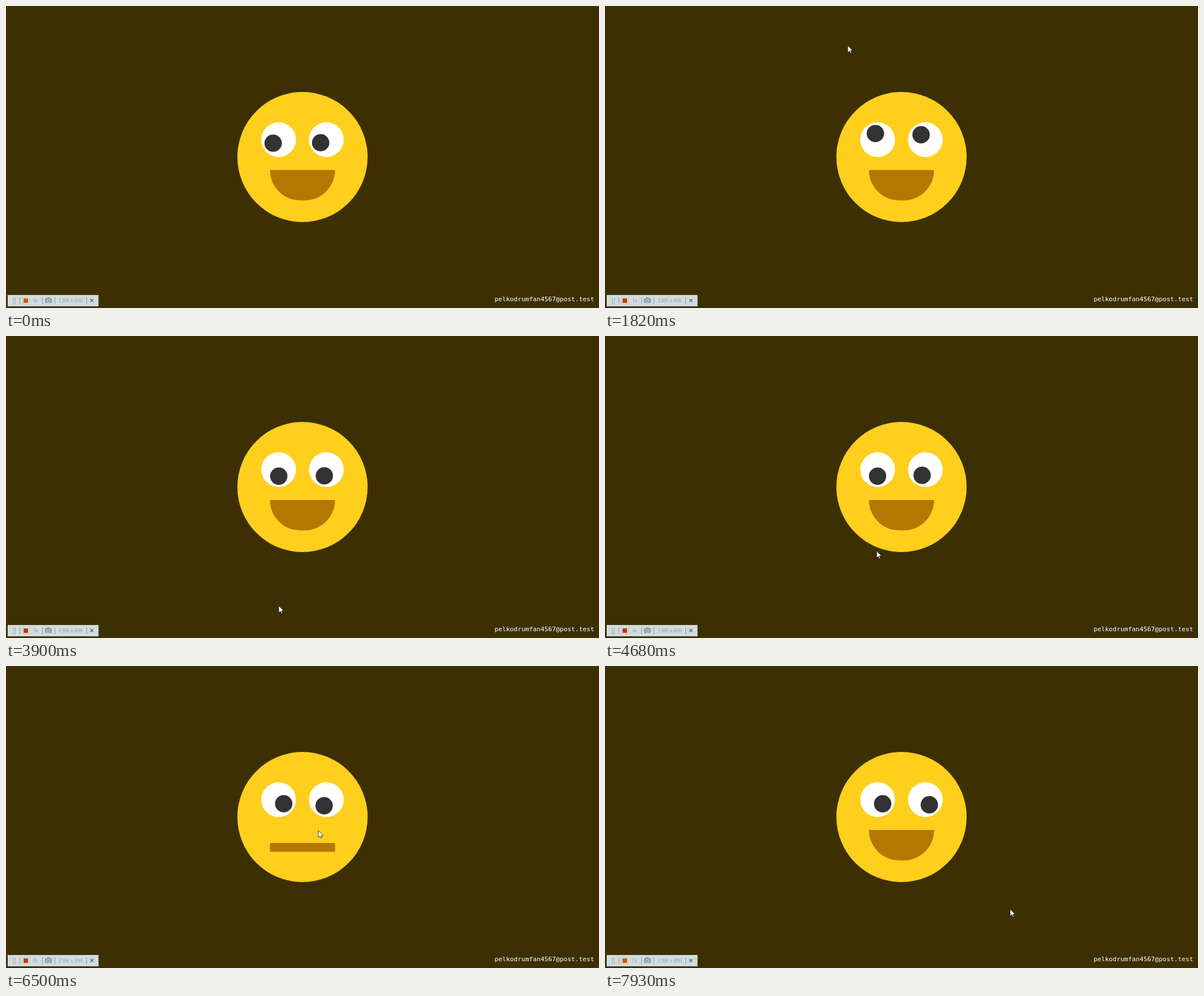
An HTML page that plays this animation: 1048x534 px, repeating every 8 s.

```html
<!DOCTYPE html>
<html lang="en">
<head>
<meta charset="utf-8">
<title>Watching face</title>
<style>
  html, body { margin: 0; height: 100%; overflow: hidden; background: #3c3002; }
  svg { display: block; width: 1048px; height: 534px; }
  .bar { font: 9.4px "Liberation Serif", serif; fill: #8f9da1; }
  .mail { font: 11.25px "DejaVu Sans Mono", monospace; fill: #fff; }
</style>
</head>
<body>
<svg viewBox="0 0 1048 534">
  <g transform="translate(524 267) scale(.7672)">
    <circle r="150" fill="#fecf1d"/>
    <path id="mouth" fill="#b47800"/>
    <g fill="#fff">
      <circle cx="-55" cy="-40" r="40"/>
      <circle cx="55" cy="-40" r="40"/>
    </g>
    <g fill="#333">
      <circle class="pupil" r="20"/>
      <circle class="pupil" r="20"/>
    </g>
  </g>

  <g class="bar">
    <rect x="3" y="511" width="160.500" height="20" fill="#d1dcdf"/>
    <path d="M13 516v11M16.5 516v11" stroke="#8b999d" stroke-width="1.4" stroke-dasharray="1.4 1"/>
    <path d="M24.5 515v12M64.5 515v12M86.5 515v12M142.5 515v12" stroke="#8b999d"/>
    <rect x="29.5" y="515.5" width="11" height="11" fill="#f1eee7" stroke="#bcc5c4"/>
    <rect id="record" x="31" y="517" width="8" height="8"/>
    <text id="seconds" x="48" y="524"></text>
    <path d="M69 517h3l1-2h4l1 2h3v8h-12z"/>
    <circle cx="75" cy="521" r="2.6" fill="none" stroke="#d1dcdf"/>
    <text x="93" y="524">1366 x 696</text>
    <path d="M149 518l5.5 5.5m0-5.5l-5.5 5.5" stroke="#5f6d70" stroke-width="1.5"/>
  </g>

  <text class="mail" x="863.5" y="522">pelkodrumfan4567@post.test</text>

  <path id="cursor" d="M0 0V16L4 12.7 6.5 18 8.8 17 6.4 11.7H11.5Z"
        fill="#fff" stroke="#111" stroke-linejoin="round"/>
</svg>

<script>
const LOOP = 8000, STEP = 130, LAG = 40, EASE_MS = 500;
const SCALE = .7672, CX = 524, CY = 267, FACE_R = 115;

// Key points of the pointer: time, x, y
const path = [
  [0, 35, 521], [910, 260, 270], [1820, 429, 70], [3120, 673, 264], [3900, 482, 477],
  [4680, 480, 380], [5460, 445, 285], [5980, 480, 290], [6500, 552, 291], [7930, 716, 430]
];

const $ = id => document.getElementById(id);
const mouth = $("mouth"), record = $("record"), seconds = $("seconds"), cursor = $("cursor");
const pupils = document.querySelectorAll(".pupil");
const mix = (a, b, k) => a + (b - a) * k;

function slope(i, axis) {
  const a = path[Math.max(i - 1, 0)], b = path[Math.min(i + 1, path.length - 1)];
  return (b[axis] - a[axis]) / (b[0] - a[0]);
}

// Smooth cubic curve through the key points
function pointer(t) {
  t = Math.min(Math.max(t, 0), path.at(-1)[0]);
  const i = Math.max(path.findIndex(p => p[0] >= t) - 1, 0);
  const a = path[i], b = path[i + 1], span = b[0] - a[0];
  const u = (t - a[0]) / span, v = 1 - u;
  return [1, 2].map(n =>
    v * v * (1 + 2 * u) * a[n] + u * u * (3 - 2 * u) * b[n] +
    span * u * v * (v * slope(i, n) - u * slope(i + 1, n)));
}

function hovers(t) {
  const [x, y] = pointer(t);
  return Math.hypot(x - CX, y - CY) < FACE_R;
}

// The pointer crosses the face once per loop
let enter = 0;
while (!hovers(enter)) enter += 10;
let leave = enter;
while (hovers(leave)) leave += 10;

// CSS "ease": cubic-bezier(.25, .1, .25, 1)
function ease(k) {
  if (k <= 0 || k >= 1) return k <= 0 ? 0 : 1;
  const bezier = (u, a, b) => 3 * u * (1 - u) * (a * (1 - u) + b * u) + u ** 3;
  let lo = 0, hi = 1;
  for (let n = 0; n < 20; n++) {
    const mid = (lo + hi) / 2;
    if (bezier(mid, .25, .25) < k) lo = mid; else hi = mid;
  }
  return bezier(lo, .1, 1);
}

// k = 0 is the open smile, k = 1 the flat mouth
function drawMouth(k) {
  const y = mix(30, 60, k), h = mix(70, 20, k);
  const r = Math.min(mix(70, 0, k), h);
  mouth.setAttribute("d",
    `M-75 ${y}h150v${h - r}a${r} ${r} 0 0 1 ${-r} ${r}H${r - 75}a${r} ${r} 0 0 1 ${-r} ${-r}z`);
}

function draw(t) {
  const [x, y] = pointer(t), [gx, gy] = pointer(t - LAG);
  cursor.setAttribute("transform", `translate(${x} ${y}) scale(${SCALE})`);
  cursor.setAttribute("visibility", t ? "visible" : "hidden");

  pupils.forEach((pupil, i) => {
    const ex = i ? 55 : -55, ey = -40;
    const angle = Math.atan2(gy - CY - ey * SCALE, gx - CX - ex * SCALE);
    pupil.setAttribute("cx", ex + 15 * Math.cos(angle));
    pupil.setAttribute("cy", ey + 15 * Math.sin(angle));
  });

  drawMouth(ease((t - enter) / EASE_MS) - ease((t - leave) / EASE_MS));
  record.setAttribute("fill", `rgb(202 ${52 + 38 * (1 - t / 4000) ** 4} 0)`);
  seconds.textContent = Math.floor(t / 1000) + "s";
}

function frame() {
  const t = performance.now() % LOOP;
  draw(t < 2 * STEP ? 0 : Math.floor(t / STEP) * STEP);
  requestAnimationFrame(frame);
}
frame();
</script>
</body>
</html>
```
